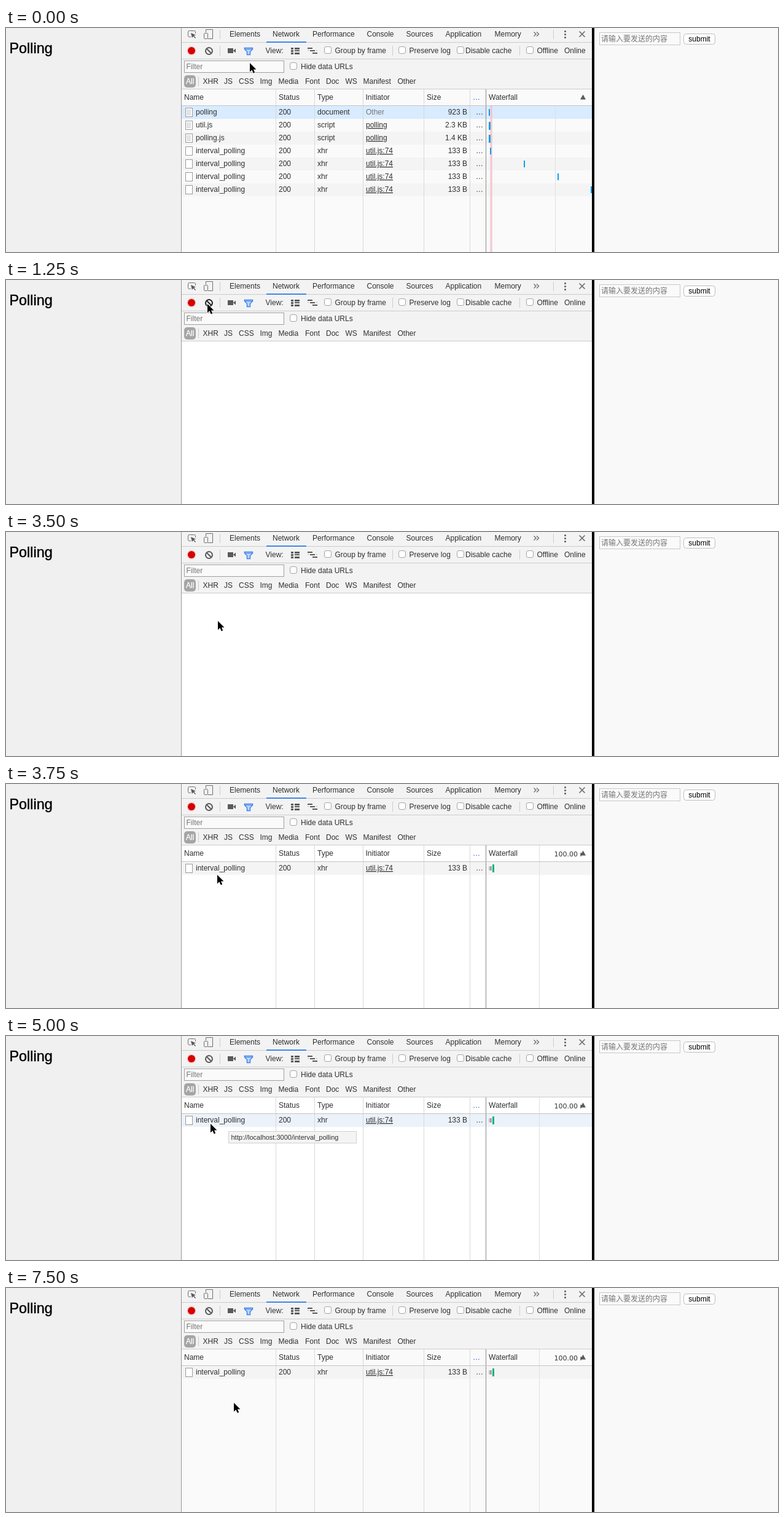
Animation of 1257 by 365 pixels, one loop 8000 ms. Source, as an HTML page:

```html
<!DOCTYPE html>
<html lang="en">
<head>
<meta charset="utf-8">
<title>Polling</title>
<style>
html, body { margin: 0; width: 100%; height: 100%; overflow: hidden; background: #f0f0f0; }
svg { display: block; font: 12px "Liberation Sans", Arial, sans-serif; fill: #303030; }
.line { fill: none; stroke: #6e6e6e; }
.cjk { font-family: "Noto Sans CJK SC", "Noto Sans CJK", sans-serif; }
.link { text-decoration: underline; }

/* every change is a hard cut on one 8 s clock */
.anim { animation: 8s step-end infinite; }
#cursor { animation-name: move; }
#clear { animation-name: darken; }
#log { animation-name: log; }
#fresh { animation-name: fresh; }
#table { animation-name: paper; }
#hover { animation-name: hover; }
#tip { animation-name: tip; }

@keyframes move {
  0% { transform: translate(397px, 57px); }
  6.25% { transform: translate(357px, 58px); }
  9.375% { transform: translate(329px, 45px); }
  12.5% { transform: translate(328px, 39px); }
  18.75% { transform: translate(378px, 135px); }
  21.875% { transform: translate(379px, 137px); }
  43.75% { transform: translate(345px, 145px); }
  46.875% { transform: translate(344px, 148px); }
  53.125% { transform: translate(334px, 142px); }
  56.25% { transform: translate(333px, 143px); }
  68.75% { transform: translate(367px, 176px); }
  71.875%, 100% { transform: translate(371px, 187px); }
}
@keyframes darken {
  0% { stroke: #5a5a5a; }
  9.375% { stroke: #222; }
  18.75%, 100% { stroke: #5a5a5a; }
}
@keyframes log {
  0% { visibility: visible; }
  15.625%, 100% { visibility: hidden; }
}
@keyframes fresh {
  0% { visibility: hidden; }
  46.875%, 100% { visibility: visible; }
}
@keyframes paper {
  0% { fill: #fafafa; }
  15.625% { fill: #fff; }
  93.75%, 100% { fill: #fafafa; }
}
@keyframes hover {
  0% { fill: #f4f4f4; }
  53.125% { fill: #ebf2fa; }
  68.75%, 100% { fill: #f4f4f4; }
}
@keyframes tip {
  0% { opacity: 0; }
  59.375% { opacity: .5; }
  62.5% { opacity: 1; }
  68.75% { opacity: .4; }
  71.875%, 100% { opacity: 0; }
}
</style>
</head>
<body>
<svg id="stage" width="1257" height="365" viewBox="0 0 1257 365"></svg>
<script>
const rect = (x, y, w, h, fill, more = '') =>
  `<rect x="${x}" y="${y}" width="${w}" height="${h}" fill="${fill}" ${more}/>`;
const box = (x, y, w, h, fill, stroke, r = 0) =>
  rect(x + .5, y + .5, w - 1, h - 1, fill, `stroke="${stroke}" rx="${r}"`);
const text = (x, y, s, more = '') => `<text x="${x}" y="${y}" ${more}>${s}</text>`;
const path = (d, more = '') => `<path d="${d}" ${more}/>`;
const labels = (y, list, more) => list.map(([x, s]) => text(x, y, s, more)).join('');
const check = (x, y) => box(x, y, 12, 12, '#fff', '#a6a6a6', 2.5);
const rule = (x, y, h) => rect(x, y, 1, h, '#ccc');

const page = () =>
  rect(0, 0, 1257, 365, '#f0f0f0') +
  text(5.5, 40.5, 'Polling', 'font-size="23.4" fill="#000" stroke="#000" stroke-width=".45"') +
  rect(954, 0, 4, 365, '#000') +
  rect(958, 0, 299, 365, '#f9f9f9') +
  box(966, 7, 132, 21, '#fafafa', '#c8c8c8') +
  text(969, 22, '请输入要发送的内容', 'class="cjk" fill="#757575"') +
  box(1103, 9, 52, 18, '#fff', '#bdbdbd', 4) +
  text(1129, 22, 'submit', 'text-anchor="middle" fill="#000"');

const tabs = () =>
  rect(286, 0, 668, 100, '#f3f3f3') +
  rect(286, 23, 668, 1, '#ccc') + rect(286, 50, 668, 1, '#ccc') + rect(286, 99, 668, 1, '#ccc') +
  rect(424, 22, 65, 2, '#4285e8') +
  path('M301 14.5H298.5Q296.5 14.5 296.5 12.5V6.500Q296.500 4.500 298.500 4.500H306.500Q308.500 4.500 308.500 6.500V9', 'class="line"') +
  path('M301 8L309 11.500L306 12.500L309 16L308 17L305 13.500L303 16Z', 'fill="#5a5a5a"') +
  path('M325.500 7V2.500H336.500V17.500H329', 'class="line"') +
  box(322, 8, 7, 10, '#f3f3f3', '#6e6e6e', 1) +
  rule(348, 3, 15) + rule(891, 3, 15) +
  labels(14, [[364, 'Elements'], [434, 'Network'], [499, 'Performance'], [587.5, 'Console'],
    [651.5, 'Sources'], [715.5, 'Application'], [795.5, 'Memory']]) +
  path('M859.500 6.500L863 10L859.500 13.500M864 6.500L867.500 10L864 13.500', 'class="line" stroke-width="1.400"') +
  [5.5, 10.5, 15.5].map(y => `<circle cx="910.5" cy="${y}" r="1.5" fill="#5a5a5a"/>`).join('') +
  path('M933.500 5.500L942.500 14.500M942.500 5.500L933.500 14.500', 'class="line" stroke-width="1.700"');

const tools = () =>
  '<circle cx="302" cy="37" r="7.5" fill="#f5cccc"/><circle cx="302" cy="37" r="6" fill="#d50000"/>' +
  '<g id="clear" class="anim" fill="none" stroke="#5a5a5a" stroke-width="2">' +
  '<circle cx="330.500" cy="37.500" r="5.500"/>' + path('M326.500 33.500L334.500 41.500') + '</g>' +
  rect(361, 33, 9, 8, '#5a5a5a') + path('M370 37L374 33.500V40.500Z', 'fill="#5a5a5a"') +
  path('M388.500 32.500H401.500V34.500L397.500 38.500V43.500H392.500V38.500L388.500 34.500Z',
    'fill="#b9d3fb" stroke="#4285e8" stroke-width="1.500"') +
  path('M389 34.500H401', 'stroke="#4285e8"') +
  [32, 36, 40].map((y, i) =>
    rect(464, y, 4, 3, '#5a5a5a') + rect(470, y, 8, i == 1 ? 2 : 3, '#5a5a5a') +
    rect(491 + i * 4, y, 8, 2, '#5a5a5a')).join('') +
  rect(491, 36, 2, 1, '#aaa') + rect(505, 36, 2, 1, '#aaa') +
  [348, 629, 836].map(x => rule(x, 29, 16)).join('') +
  [518, 639, 734, 847].map(x => check(x, 30)).join('') +
  labels(41, [[422.5, 'View:'], [535.5, 'Group by frame'], [656.5, 'Preserve log'],
    [748, 'Disable cache'], [864.5, 'Offline'], [909, 'Online']]);

const filters = () =>
  box(290, 53, 163, 20, '#fafafa', '#a0a0a0') +
  text(293.5, 67, 'Filter', 'fill="#757575"') +
  check(462, 56) + text(480, 67, 'Hide data URLs') +
  rect(290, 77, 19, 20, '#a5a5a5', 'rx="5"') +
  text(293, 91, 'All', 'fill="#fff" stroke="#fff" stroke-width=".3"') +
  rule(313, 79, 16) +
  labels(91, [[320.5, 'XHR'], [355, 'JS'], [379, 'CSS'], [413.5, 'Img'], [443.5, 'Media'],
    [487, 'Font'], [521, 'Doc'], [552.5, 'WS'], [581.5, 'Manifest'], [637.5, 'Other']]);

const header = () =>
  rect(286, 126, 668, 1, '#c4c4c4') +
  labels(117, [[290, 'Name'], [444, 'Status'], [507, 'Type'], [585.5, 'Initiator'],
    [685, 'Size'], [786, 'Waterfall']]) +
  text(760, 117, '…', 'fill="#1a55b5"') +
  path('M935 116.500L939.500 108.500L944 116.500Z', 'fill="#5a5a5a"');

const columns = grid =>
  [439, 502, 581, 680, 755].map(x => rect(x, 100, 1, 265, '#d9d9d9')).join('') +
  rect(781, 100, 1, 265, '#8c8c8c') + rect(grid, 127, 1, 238, '#e0e0e0');

const row = (i, name, type, from, size) => {
  const y = 127 + i * 21, base = y + 14;
  return box(292, y + 3, 12, 15, '#fff', '#9a9a9a') +
    (type == 'xhr' ? '' : path([6, 8, 10, 12, 14].map(d => `M294 ${y + d + .5}h7`).join(''), 'stroke="#c8c8c8"')) +
    labels(base, [[309, name], [444, 200], [507, type]]) +
    text(586, base, from, from == 'Other' ? 'fill="#777"' : 'class="link"') +
    text(751, base, size, 'text-anchor="end"') + text(765, base, '…');
};

const log = () => {
  const files = [['polling', 'document', 'Other', '923 B'], ['util.js', 'script', 'polling', '2.3 KB'],
    ['polling.js', 'script', 'polling', '1.4 KB']];
  for (let i = 0; i < 4; i++) files.push(['interval_polling', 'xhr', 'util.js:74', '133 B']);
  const bars = [786, 786, 786, 788, 843, 898, 952];
  const stripes = files.map((f, i) => i % 2 ? '' : rect(286, 127 + i * 21, 668, 21, i ? '#f4f4f4' : '#d9ebff'));
  return stripes.join('') + columns(894) +
    rect(788, 127, 1, 238, '#d9d3f3') + rect(789.5, 127, 2, 238, '#f9bcbc') +
    files.map((f, i) => row(i, ...f) +
      rect(bars[i], 132 + i * 21, i == 1 || i == 2 ? 3 : 2, i == 1 || i == 2 ? 13 : 11, '#149cee')).join('') +
    header();
};

const fresh = () =>
  rect(286, 127, 668, 21, '#f4f4f4', 'id="hover" class="anim"') + columns(868) +
  rect(868, 100, 1, 27, '#e0e0e0') +
  row(0, 'interval_polling', 'xhr', 'util.js:74', '133 B') +
  rect(786, 134, 2, 7, '#c8c8c8') + rect(788, 134, 3, 7, '#a3a3a3') + rect(792, 131, 3, 13, '#18b184') +
  header() +
  '<clipPath id="cut"><path d="M880 101H937V126H880Z"/></clipPath>' +
  text(892.5, 118, '100.00 ms', 'clip-path="url(#cut)" font-family="DejaVu Sans, sans-serif" font-size="11"');

const group = (id, body) => `<g id="${id}" class="anim">${body}</g>`;

document.getElementById('stage').innerHTML =
  page() + tabs() + tools() + filters() +
  rect(286, 100, 668, 265, '#fafafa', 'id="table" class="anim"') +
  group('log', log()) + group('fresh', fresh()) +
  rect(285, 0, 1, 365, '#989898') +
  group('tip', box(362, 155, 209, 20, '#f4f4f4', '#d0d0d0') +
    text(366.5, 169, 'http://localhost:3000/interval_polling', 'font-size="11"')) +
  group('cursor', path('M0 0V14.500L3.400 11.300L5.700 16.500L8.200 15.400L6 10.400H10.500Z',
    'fill="#000" stroke="#fff" stroke-width="1.200" paint-order="stroke"'));
</script>
</body>
</html>
```
